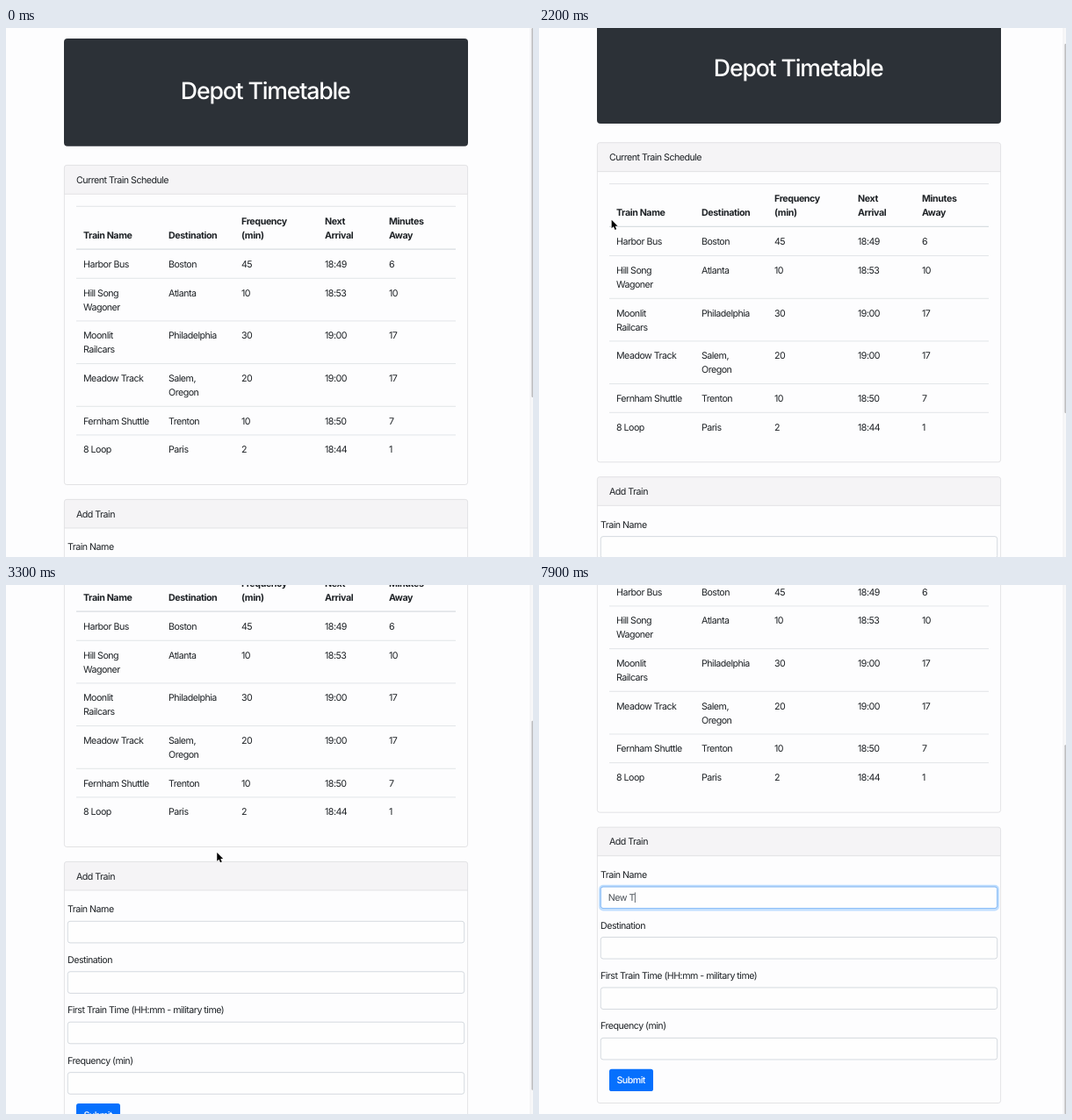
Animation, 600 px wide and 603 px high, one loop 8000 ms. Source, as an HTML page:

```html
<!DOCTYPE html>
<html lang="en">
<head>
<meta charset="utf-8">
<title>Timetable</title>
<style>
html, body { margin: 0; width: 100%; height: 100%; overflow: hidden; background: #fdfdfe; }
svg { display: block; width: 600px; height: 603px; }
text {
  font: 400 10.67px Inter, Roboto, sans-serif;
  letter-spacing: -.048em;
  fill: #1d2125;
  white-space: pre;
  text-rendering: geometricPrecision;
}
.bold { font-weight: 700; letter-spacing: -.036em; }
.title { font-size: 26.67px; font-weight: 500; letter-spacing: -.044em; fill: #fff; text-anchor: middle; }
.btn { font-weight: 500; fill: #fff; }
.typed { fill: #495057; }
</style>
</head>
<body>
<svg id="stage" viewBox="0 0 600 603" xmlns="http://www.w3.org/2000/svg">
  <rect width="600" height="603" fill="#fdfdfe"/>
  <g id="page"></g>
  <rect x="597" width="3" height="603" fill="#f8f8f9"/>
  <rect x="596.7" width=".6" height="603" fill="#e9e9eb"/>
  <rect id="thumb" x="598.4" width="3" height="421" rx="1.2" fill="#bdbdbf"/>
  <path id="arrow" d="M0 0V9.7L2.2 7.7L3.8 11.3L5.5 10.6L4 7.1H6.9Z" fill="#000" stroke="#fff" stroke-width=".8" paint-order="stroke"/>
  <g id="beam" fill="none" stroke-linecap="round">
    <path d="M-2.3-5Q-.2-5 0-4Q.2-5 2.3-5M0-4V4M-2.3 5Q-.2 5 0 4Q.2 5 2.3 5M-1.2 1.4H1.2" stroke="#fff" stroke-width="2"/>
    <path d="M-2.3-5Q-.2-5 0-4Q.2-5 2.3-5M0-4V4M-2.3 5Q-.2 5 0 4Q.2 5 2.3 5M-1.2 1.4H1.2" stroke="#111" stroke-width=".95"/>
  </g>
</svg>
<script>
const LOOP = 8000, STEP = 100;
const $ = id => document.getElementById(id);
const page = $('page');

function add(tag, attrs, content) {
  const el = document.createElementNS('http://www.w3.org/2000/svg', tag);
  for (const k in attrs) el.setAttribute(k, attrs[k]);
  if (content) el.textContent = content;
  page.appendChild(el);
  return el;
}
// y is the middle of the capitals
const label = (x, y, str, cls = '') => add('text', { x, y: y + 3.85, class: cls }, str);
const rule = (x1, x2, y, color, w = .8) => add('path', { d: `M${x1} ${y}H${x2}`, stroke: color, 'stroke-width': w });

function card(top, bottom, head, name) {
  const box = { x: 66.4, width: 459.2, rx: 2.7, y: top };
  add('rect', { ...box, height: bottom - top, fill: '#fdfdfe' });
  add('path', { d: `M66.4 ${head}V${top + 2.7}q0-2.7 2.7-2.7H522.9q2.7 0 2.7 2.7V${head}Z`, fill: '#f5f4f6' });
  rule(66.4, 525.6, head, '#dcdcdf');
  add('rect', { ...box, height: bottom - top, fill: 'none', stroke: '#dcdcdf', 'stroke-width': .8 });
  label(80, (top + head) / 2 + .1, name);
}

// Banner
add('rect', { x: 66, y: 12, width: 460, height: 122.7, rx: 4, fill: '#2c3137' });
add('text', { x: 295.2, y: 81, class: 'title' }, 'Depot Timetable');

// Schedule
const LINE = 16, cols = [88, 185, 268, 363, 436];
card(156.4, 520.5, 189.3, 'Current Train Schedule');
rule(80, 512, 203.3, '#dbdfe3');
['|Train Name', '|Destination', 'Frequency|(min)', 'Next|Arrival', 'Minutes|Away'].forEach((h, i) =>
  h.split('|').forEach((s, n) => s && label(cols[i], 219.8 + n * LINE, s, 'bold')));
rule(80, 512, 252.1, '#d8dde1', 1.33);

const rows = [
  ['Harbor Bus', 'Boston', '45', '18:49', '6'],
  ['Hill Song|Wagoner', 'Atlanta', '10', '18:53', '10'],
  ['Moonlit|Railcars', 'Philadelphia', '30', '19:00', '17'],
  ['Meadow Track', 'Salem,|Oregon', '20', '19:00', '17'],
  ['Fernham Shuttle', 'Trenton', '10', '18:50', '7'],
  ['8 Loop', 'Paris', '2', '18:44', '1']
];
let y = 252.6;
rows.forEach((row, r) => {
  if (r) rule(80, 512, y, '#dbdfe3');
  let lines = 1;
  row.forEach((cell, i) => {
    const parts = cell.split('|');
    lines = Math.max(lines, parts.length);
    parts.forEach((s, n) => label(cols[i], y + 16.6 + n * LINE, s));
  });
  y += 16.67 + lines * LINE;
});

// Form
card(537.4, 851.8, 570, 'Add Train');
const ring = add('rect', { x: 69.2, y: 604.2, width: 453.6, height: 27.4, rx: 3.8, fill: 'none', stroke: '#bfdeff', 'stroke-width': 2.2 });
const inputs = ['Train Name', 'Destination', 'First Train Time (HH:mm - military time)', 'Frequency (min)'].map((s, i) => {
  const top = 591.6 + i * 57.45;
  label(70, top, s);
  return add('rect', { x: 70.3, y: top + 13.7, width: 451.4, height: 24.6, rx: 2.7, fill: '#fefefe', stroke: '#ced4da', 'stroke-width': .85 });
});
const focusLine = add('rect', { x: 70.3, y: 605.3, width: 451.4, height: 24.6, rx: 2.7, fill: 'none', stroke: '#7ab8ff', 'stroke-width': .9 });
const typed = label(78.7, 617.7, '', 'typed');
const caret = add('rect', { y: 611.7, width: .8, height: 11.6, fill: '#3c4249' });
add('rect', { x: 80, y: 813, width: 50, height: 25.4, rx: 2.7, fill: '#0670fd' });
label(88.4, 825.8, 'Submit', 'btn');

// Motion: [time, value...]
const scrollKeys = [[1400, 0], [1500, 2], [1800, 16.7], [2000, 22], [2100, 22], [2400, 33], [2500, 33],
  [2600, 58], [2800, 141], [2900, 152], [3000, 152], [3300, 222], [3500, 255], [3600, 261.3]];
const mouseKeys = [[200, 1, 240], [400, 62, 232], [600, 145, 203], [700, 179, 187], [850, 128, 200], [1000, 78, 213.5],
  [2100, 78, 213.5], [2400, 92, 229], [2500, 92, 229], [2600, 103, 240], [2800, 185, 278], [2900, 205, 287],
  [3000, 205, 287], [3400, 252, 311], [3700, 256.5, 314.5], [3900, 242, 313], [4100, 225, 314],
  [4300, 225, 314], [4700, 205, 349]];
const keyTimes = [6200, 6800, 7100, 7500, 7800], word = 'New T';
const FOCUS = 4800;

function at(keys, t) {
  if (t <= keys[0][0]) return keys[0].slice(1);
  const i = keys.findIndex(k => k[0] > t);
  if (i < 0) return keys[keys.length - 1].slice(1);
  const a = keys[i - 1], b = keys[i], f = (t - a[0]) / (b[0] - a[0]);
  return a.slice(1).map((v, n) => v + (b[n + 1] - v) * f);
}
const show = (el, on) => el.setAttribute('visibility', on ? 'visible' : 'hidden');

function draw(time) {
  const t = Math.floor(time % LOOP / STEP) * STEP;
  const [s] = at(scrollKeys, t);
  page.setAttribute('transform', `translate(0 ${-s})`);
  $('thumb').setAttribute('y', s * .697);

  const [mx, my] = at(mouseKeys, t);
  const isBeam = t >= 2300 && t < 3200 || t >= 4600;
  const visible = t >= 200 && t < keyTimes[0];
  for (const id of ['arrow', 'beam']) {
    $(id).setAttribute('transform', `translate(${mx} ${my})`);
    show($(id), visible && isBeam === (id === 'beam'));
  }

  const glow = Math.min(1, Math.max(0, (t - FOCUS + 50) / 150));
  ring.setAttribute('opacity', glow);
  focusLine.setAttribute('opacity', glow);

  const count = keyTimes.filter(k => k <= t).length;
  typed.textContent = word.slice(0, count);
  const width = count ? typed.getComputedTextLength() : 0;
  caret.setAttribute('x', 78.8 + width);
  show(caret, t >= FOCUS && (count > 0 || (t - FOCUS) % 1000 < 500));
}

const start = performance.now();
function tick() {
  draw(performance.now() - start);
  requestAnimationFrame(tick);
}
tick();
</script>
</body>
</html>
```
